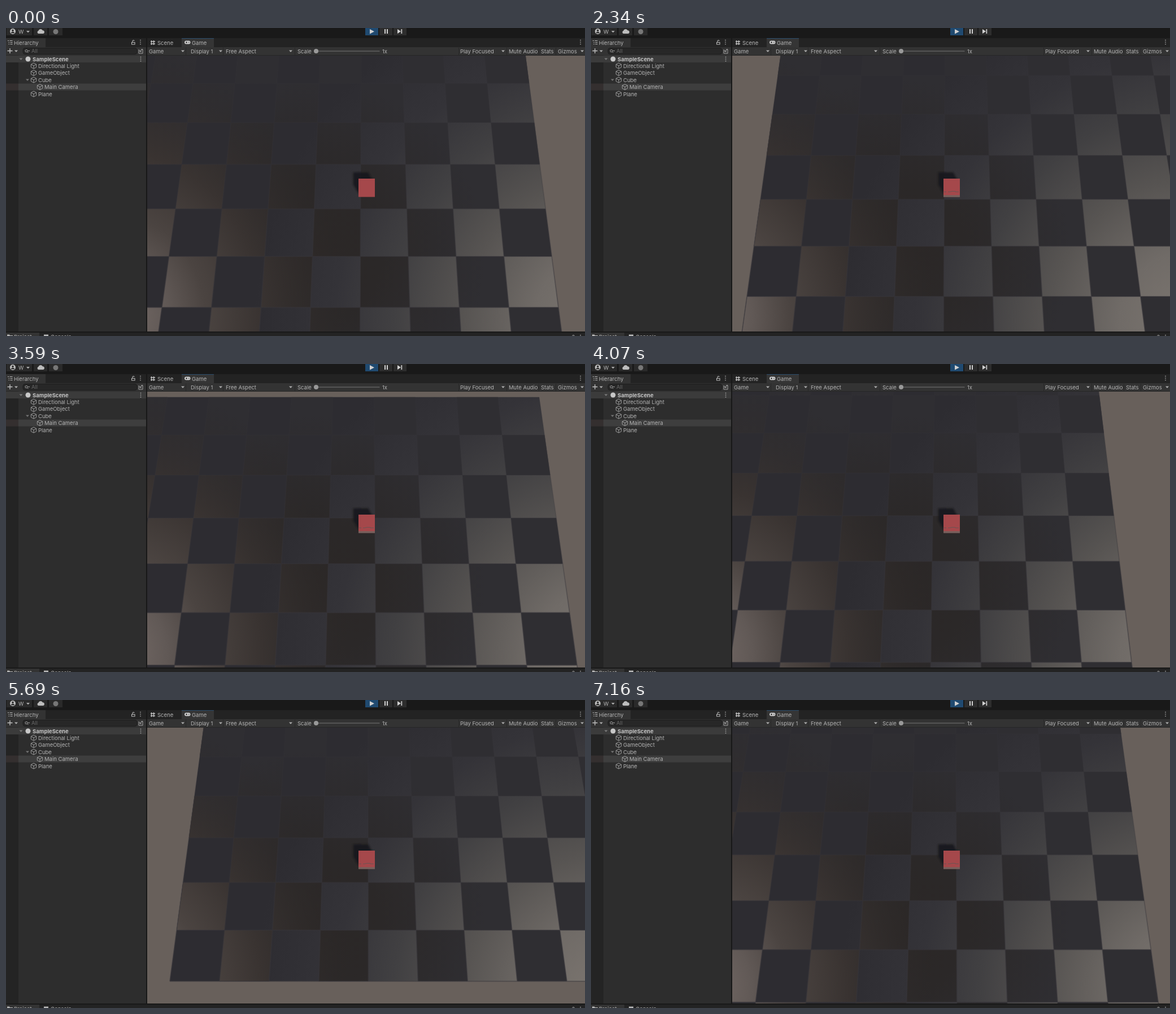
An HTML page for the animation above (8.02 s loop, 1025 by 546 pixels).

```html
<!DOCTYPE html>
<html lang="en">
<head>
<meta charset="utf-8">
<title>Editor play mode</title>
<style>
  html, body { margin: 0; width: 100%; height: 100%; overflow: hidden; background: #191919; }
  svg { display: block; width: 100vw; height: 100vh; }
  text { font: 9.5px Inter, Roboto, sans-serif; fill: #b4b4b4; white-space: pre; }
</style>
</head>
<body>
<svg viewBox="0 0 1025 546" preserveAspectRatio="none">
  <defs>
    <clipPath id="view"><rect x="250" y="49" width="775" height="489"/></clipPath>
    <clipPath id="foot"><rect y="541" width="1025" height="5"/></clipPath>
    <filter id="soft" x="-30%" y="-30%" width="160%" height="160%"><feGaussianBlur stdDeviation="1.5"/></filter>
    <radialGradient id="glare" gradientUnits="userSpaceOnUse" cx="1060" cy="520" r="620">
      <stop offset="0" stop-color="#7c7670"/>
      <stop offset=".2" stop-color="#706b67"/>
      <stop offset=".4" stop-color="#575452"/>
      <stop offset=".6" stop-color="#414042"/>
      <stop offset=".77" stop-color="#343338"/>
      <stop offset="1" stop-color="#2d2c31"/>
    </radialGradient>
    <radialGradient id="dark" gradientUnits="userSpaceOnUse" cx="540" cy="400" r="310">
      <stop offset="0" stop-color="#2b2726"/>
      <stop offset=".4" stop-color="#2b2828"/>
      <stop offset="1" stop-color="#2f2e32"/>
    </radialGradient>
    <radialGradient id="warm" gradientUnits="userSpaceOnUse" cx="0" cy="0" r="420" gradientTransform="translate(200 510) scale(1 1.15)">
      <stop offset="0" stop-color="#756b67"/>
      <stop offset=".2" stop-color="#615956"/>
      <stop offset=".36" stop-color="#4b4441"/>
      <stop offset=".6" stop-color="#393331"/>
      <stop offset="1" stop-color="#2b2828" stop-opacity="0"/>
    </radialGradient>
    <linearGradient id="seam" gradientUnits="userSpaceOnUse" x1="0" y1="100" x2="0" y2="500">
      <stop offset="0" stop-color="#37353a" stop-opacity=".12"/>
      <stop offset="1" stop-color="#37353a" stop-opacity=".55"/>
    </linearGradient>
    <g id="cubeIcon" fill="none" stroke="#a8a8a8" stroke-width=".9" stroke-linejoin="round">
      <path d="M0-5L4.7-2.6V2.6L0 5L-4.7 2.6V-2.6ZM-4.7-2.6L0 0L4.7-2.6M0 0V5"/>
    </g>
    <path id="down" d="M-3-1.6H3L0 1.8Z" fill="#b0b0b0"/>
    <path id="dots" d="M0-3.5v0M0 0v0M0 3.5v0" stroke="#b9b9b9" stroke-width="1.7" stroke-linecap="round"/>
  </defs>

  <!-- Game view -->
  <g clip-path="url(#view)">
    <rect x="250" y="49" width="775" height="489" fill="#68605b"/>
    <path id="plane" fill="url(#glare)"/>
    <path id="cells" fill="url(#dark)"/>
    <path id="cellsWarm" fill="url(#warm)"/>
    <path id="lines" fill="none" stroke="url(#seam)" stroke-width="1.8"/>
    <path d="M614.5 256L641 255.5L648 268L632 296L623 292L614.5 277Z" fill="#16161a" opacity=".88" filter="url(#soft)"/>
    <rect x="624" y="267" width="29" height="32.5" fill="#a5484b"/>
    <g id="rim" opacity="0">
      <rect x="624" y="296.5" width="29" height="3" fill="#73625e"/>
      <path d="M625 290.5h4m3 0h3l4-1h5l2 1h5" fill="none" stroke="#6b5453" stroke-width="1.2"/>
    </g>
  </g>

  <!-- Main toolbar -->
  <rect width="1025" height="18" fill="#191919"/>
  <path d="M1 0H46V13H1ZM49 0H73V13H49ZM76 0H100V13H76Z" fill="#2a2a2a"/>
  <circle cx="12" cy="6" r="5" fill="#bdbdbd"/>
  <path d="M9 9.2a3 2.6 0 0 1 6 0Z" fill="#2a2a2a"/>
  <circle cx="12" cy="4.2" r="1.7" fill="#2a2a2a"/>
  <path d="M57.5 10a2.7 2.7 0 0 1 0-5.2a4 4 0 0 1 7.3-.6a2.9 2.9 0 0 1 .4 5.8Z" fill="#bdbdbd"/>
  <circle cx="88" cy="6.5" r="4.5" fill="#777"/>
  <rect x="636" width="23" height="13" fill="#204a70"/>
  <path d="M661 0H684V13H661ZM686 0H709V13H686Z" fill="#2d2d2d"/>
  <path d="M644 2L652 6.2L644 10.4ZM670 2h2v8h-2ZM674 2h2v8h-2ZM693 2L699 6L693 10ZM699.5 2h1.7v8h-1.7Z" fill="#d0d0d0"/>

  <!-- Hierarchy -->
  <rect y="18" width="248" height="520" fill="#2d2d2d"/>
  <rect y="18" width="248" height="16" fill="#232323"/>
  <rect y="18" width="70" height="16" fill="#333"/>
  <rect y="34" width="248" height="14.5" fill="#333"/>
  <rect y="48.5" width="22" height="489.5" fill="#242424"/>
  <rect y="49" width="248" height="12" fill="#3b3b3b"/>
  <rect x="22" y="98.5" width="226" height="12" fill="#3e3e3e"/>
  <rect y="98.5" width="22" height="12" fill="#342f2f"/>
  <path d="M3 22.5h2m1.5 0h5M4.5 25.5h1.5m1.5 0h4M4.5 28.5h1.5m1.5 0h4" stroke="#b9b9b9"/>
  <path d="M222.5 25.5h5.5v3.5h-5.5ZM224 25.5v-2a1.5 1.5 0 0 1 3-.5" fill="none" stroke="#b9b9b9" stroke-width="1.1"/>
  <path d="M7 36v9M2.5 40.5h9" stroke="#c4c4c4" stroke-width="1.3"/>
  <rect x="30" y="35.5" width="202" height="11" rx="4" fill="#272727" stroke="#1d1d1d"/>
  <path d="M34 41a2 2 0 1 0 4-1a2 2 0 1 0-4 1m3.5 1l2 2m-.5-3.5h3" fill="none" stroke="#a5a5a5"/>
  <path d="M235 38v7h7v-7h-3M242 37l-5 5m0-3v3h3" fill="none" stroke="#a5a5a5"/>
  <circle cx="39" cy="55" r="4.5" fill="#c8c8c8"/>

  <!-- Game tab bar -->
  <rect x="248" y="18" width="2" height="520" fill="#181818"/>
  <rect x="250" y="18" width="775" height="16" fill="#232323"/>
  <rect x="311" y="18" width="57" height="16" fill="#353535"/>
  <rect x="311" y="18" width="57" height="1" fill="#2c4d6c"/>
  <rect x="250" y="34" width="775" height="14.5" fill="#333"/>
  <path d="M318.5 34.5v14M384.5 34.5v14M511.5 34.5v14M801.5 34.5v14M886.5 34.5v14M943.5 34.5v14M973.5 34.5v14" stroke="#282828"/>
  <path d="M257.5 22v8M261.5 22v8M256 24h8M256 28h8" fill="none" stroke="#c0c0c0" stroke-width="1.3"/>
  <rect x="316" y="22.5" width="10.5" height="6" rx="3" fill="#c8c8c8"/>
  <path d="M318 25.5h3M319.5 24v3M323 25.5h1.5" stroke="#353535"/>
  <path d="M549 41H661.5" stroke="#777"/>
  <circle cx="549" cy="41" r="4" fill="#999"/>

  <!-- Bottom edge -->
  <rect y="538" width="1025" height="8" fill="#191919"/>
  <rect y="540" width="1025" height="6" fill="#232323"/>
  <rect y="540" width="59" height="6" fill="#333"/>
  <g clip-path="url(#foot)">
    <path d="M2 543.5h4l1 1.5h5v3H2ZM67 543.5h8v4h-8Z" fill="#b9b9b9"/>
    <text x="14" y="551">Project</text><text x="79" y="551">Console</text>
    <text x="1002" y="551">?</text>
  </g>
  <use href="#dots" x="1017" y="548"/>
  <g id="labels"></g>
</svg>
<script>
const $ = id => document.getElementById(id);

const labels = [
  [22, 9.5, 'W'], [14, 29.5, 'Hierarchy'], [45, 44, 'All', '#666'],
  [47, 58.5, 'SampleScene', '#c4c4c4', 700],
  [57, 70.5, 'Directional Light'], [57, 83, 'GameObject'], [57, 95.5, 'Cube'],
  [68, 108, 'Main Camera'], [57, 120.5, 'Plane'],
  [268, 29.5, 'Scene'], [329, 29.5, 'Game'],
  [253, 44.5, 'Game'], [327, 44.5, 'Display 1'], [389, 44.5, 'Free Aspect'],
  [516, 44.5, 'Scale'], [666, 44.5, '1x'], [804, 44.5, 'Play Focused'],
  [890, 44.5, 'Mute Audio'], [947, 44.5, 'Stats'], [977, 44.5, 'Gizmos']
];
const icons = {
  cubeIcon: [[49, 67], [49, 79.5], [49, 92], [60, 104.5], [49, 117]],
  down: [[39, 6.5], [18, 41], [313, 41], [380, 41], [504, 41], [880, 41], [1020, 41]],
  dots: [[238, 25], [238.5, 55], [1017, 25]]
};
let html = labels.map(([x, y, s, color = '#b4b4b4', weight = 400]) =>
  `<text x="${x}" y="${y}" style="fill:${color};font-weight:${weight}">${s}</text>`).join('');
for (const id in icons)
  for (const [x, y] of icons[id]) html += `<use href="#${id}" x="${x}" y="${y}"/>`;
for (const [x, y] of [[26.5, 55], [38, 92]])
  html += `<use href="#down" x="${x}" y="${y}" opacity=".55"/>`;
$('labels').innerHTML = html;

const LOOP = 8020, SIZE = 10;
const runs = [[1530, 12], [2340, 12], [3170, 12], [4000, 12], [4810, 12], [5630, 13], [6480, 11], [7228, 1]];
// Plane's left edge and far edge, in cells relative to the camera.
const left = [[1530, -6.12], [2150, -4.15], [3100, -4.15], [3760, -6.405], [4535, -6.405],
  [5255, -3.955], [5700, -3.955], [6460, -5.885]];
const far = [[2110, 36.93], [3100, 33.525], [3760, 33.525], [4070, 34.585], [4630, 36.487],
  [5255, 36.487], [5680, 37.895], [6440, 37.895], [7150, 35.505]];

function track(keys, t) {
  if (t <= keys[0][0]) return keys[0][1];
  for (let i = 1; i < keys.length; i++) {
    const [t0, a] = keys[i - 1], [t1, b] = keys[i];
    if (t < t1) return a + (b - a) * (t - t0) / (t1 - t0);
  }
  return keys[keys.length - 1][1];
}

// Steps fall on 10 ms marks, so allow for their rounding.
function stepTime(t) {
  for (let i = runs.length - 2; i >= 0; i--) {
    const [start, count] = runs[i];
    if (t >= start) {
      const step = (runs[i + 1][0] - start) / count;
      return start + step * Math.min(count - 1, Math.floor((t - start + 8) / step));
    }
  }
  return 0;
}

// Ground to screen: depth sets y, and the width of a cell grows with y.
function project(x, depth) {
  const u = 73046 / depth;
  return `${(637.5 + 0.03355 * u * x).toFixed(2)} ${(u - 2120).toFixed(2)}`;
}

function render(time) {
  const t = stepTime(time), x0 = track(left, t), z0 = track(far, t);
  const at = (c, r) => project(x0 + c, z0 - r);
  const quad = (c, r, n) => `M${at(c, r)}L${at(c + n, r)}L${at(c + n, r + n)}L${at(c, r + n)}Z`;
  let cells = '', lines = '';
  for (let r = 0; r < SIZE; r++)
    for (let c = r % 2; c < SIZE; c += 2) cells += quad(c, r, 1);
  for (let i = 0; i <= SIZE; i++)
    lines += `M${at(i, 0)}L${at(i, SIZE)}M${at(0, i)}L${at(SIZE, i)}`;
  $('plane').setAttribute('d', quad(0, 0, SIZE));
  $('cells').setAttribute('d', cells);
  $('cellsWarm').setAttribute('d', cells);
  $('lines').setAttribute('d', lines);
  $('rim').setAttribute('opacity', t > 1530 ? 1 : 0);
}

const begin = performance.now();
function tick() {
  render((performance.now() - begin) % LOOP);
  requestAnimationFrame(tick);
}
tick();
</script>
</body>
</html>
```
